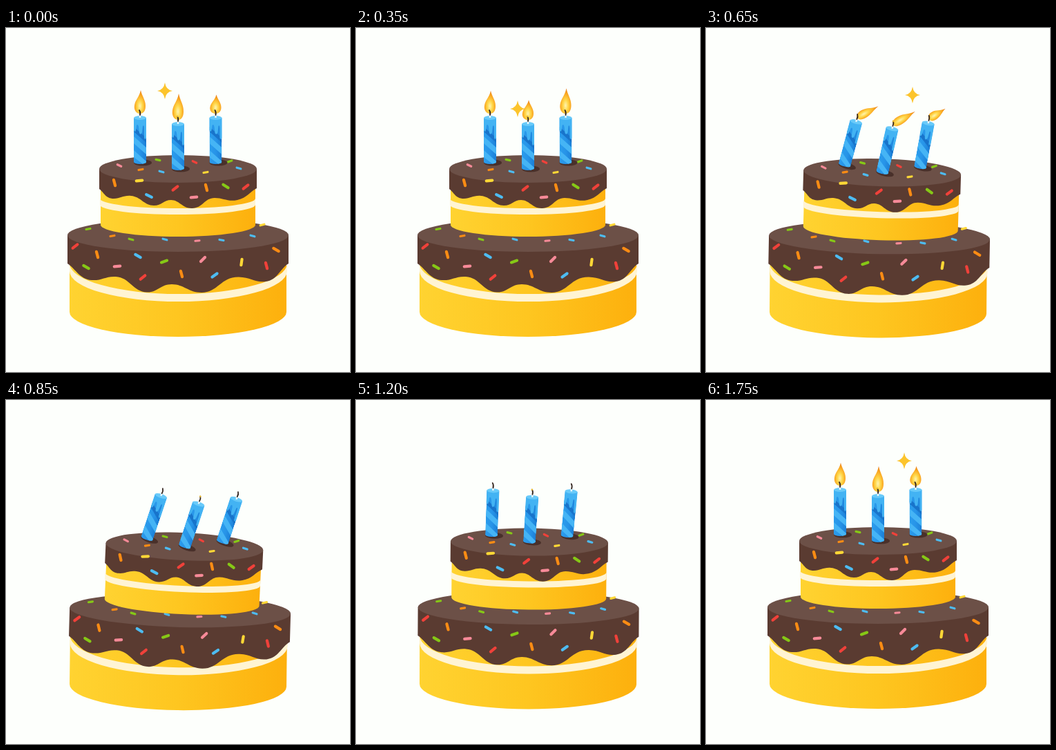
An HTML page that plays this animation: 498 px wide and 498 px high, repeating every 1.8 s.

```html
<!DOCTYPE html>
<html lang="en">
<head>
<meta charset="utf-8">
<title>Birthday cake</title>
<style>
html, body { margin: 0; width: 100%; height: 100%; overflow: hidden; background: #fdfffc; }
svg { display: block; width: 100vw; height: 100vh; }
</style>
</head>
<body>
<svg viewBox="0 0 498 498">
  <defs>
    <linearGradient id="sponge">
      <stop offset="0" stop-color="#ffd331"/>
      <stop offset=".5" stop-color="#fec620"/>
      <stop offset="1" stop-color="#fdb00d"/>
    </linearGradient>
    <linearGradient id="wax">
      <stop offset="0" stop-color="#2b9cec"/>
      <stop offset=".5" stop-color="#2794e8"/>
      <stop offset="1" stop-color="#1b7fd6"/>
    </linearGradient>
    <radialGradient id="fire" cx=".5" cy=".68" r=".65">
      <stop offset="0" stop-color="#fff3b0"/>
      <stop offset=".35" stop-color="#ffd84a"/>
      <stop offset=".75" stop-color="#f9a41f"/>
      <stop offset="1" stop-color="#e9811f"/>
    </radialGradient>
    <clipPath id="stick"><path d="M-9-65V-1A9 3 0 0 0 9-1V-65Z"/></clipPath>
    <g id="candle">
      <ellipse cx="4" cy="0" rx="13" ry="4.5" fill="#49302a"/>
      <g clip-path="url(#stick)">
        <path d="M-9-70H9V4H-9Z" fill="url(#wax)"/>
        <path d="M-9-38L9-22V-12L-9-28ZM-9-18L9-2V6L-9-8Z" fill="#45b4f5"/>
        <path d="M-9-52L9-36V-29L-9-45Z" fill="#1874cb"/>
      </g>
      <path d="M-9-65V-47Q-7.500-43-6-47L-5-54Q-3-57-2-52L-1-43Q1-39 3-44L4-53Q6-56 6-48V-36Q7.500-32 9-36V-65Z" fill="#43b3f3"/>
      <ellipse cy="-65" rx="9" ry="3" fill="#69caf9"/>
      <path d="M0-65V-70" stroke="#e9f6fb" stroke-width="2.500"/>
    </g>
  </defs>

  <g id="base">
    <path d="M92 325V411A157 36 0 0 0 406 411V325Z" fill="url(#sponge)"/>
    <path d="M92 341A157.500 44 0 0 0 407 341V352A157.500 44 0 0 1 92 352Z" fill="#fff4d3"/>
  </g>
  <g id="icing">
    <path d="M89 300V341C101 349 107 364 124 365C139 366 144 359 159 360C179 361 184 382 204 382.500C220 383 223 371 240 371C258 371 264 383 283 383C307 383 311 360 337 360.500C355 361 360 369 376 367C393 365 396 349 409 341V300Z" fill="#5a3b31"/>
    <ellipse cx="249" cy="300" rx="160" ry="24" fill="#6c5047"/>
  </g>
  <g id="upper">
    <path d="M137 225V285A112 17 0 0 0 361 285V225Z" fill="url(#sponge)"/>
    <path d="M136 247A112.500 14 0 0 0 361 247V256A112.500 14 0 0 1 136 256Z" fill="#fff4d3"/>
    <path d="M135 204V233C142 238 144 247 156 247C166 247 170 242 181 243C195 244 200 257 214 257C226 257 228 249 239 249C251 249 255 261 269 261C285 261 287 246 302 246C315 246 321 252 335 249C349 246 353 237 363 232V204Z" fill="#5a3b31"/>
    <ellipse cx="249" cy="204" rx="114" ry="20" fill="#6c5047"/>
  </g>
  <path id="spark" d="M0-12Q1.500-1.500 11 0Q1.500 1.500 0 12Q-1.500 1.500-11 0Q-1.500-1.500 0-12Z" fill="#fcc42c"/>
  <g id="candles"></g>
</svg>
<script>
const LOOP = 1800, STEP = 50;
const $ = id => document.getElementById(id);
const colors = { r: '#f0413a', o: '#fb8c14', y: '#ffd836', g: '#86c816', b: '#4dbcf2', p: '#f78a98' };

// Each sprinkle: color, x, y, angle
function sprinkle(id, length, width, items) {
  $(id).insertAdjacentHTML('beforeend', items.split(',').map(item => {
    const [c, x, y, angle] = item.split(' ');
    return `<path d="M${-length / 2} 0H${length / 2}" stroke="${colors[c]}" stroke-width="${width}"
      stroke-linecap="round" transform="translate(${x} ${y}) rotate(${angle})"/>`;
  }).join(''));
}
sprinkle('icing', 6, 3.2, 'g 119 291 -10,o 154 301 -10,g 181 306 15,b 230 306 15,p 277 308 -5,b 312 307 10,b 357 301 15,y 371 285 -15');
sprinkle('icing', 8.5, 4.2, 'r 100 316 -38,o 132 328 75,b 191 330 30,o 391 321 30,p 285 335 -45,g 229 338 -20,y 341 339 -82,g 116 346 30,p 161 345 -5,o 254 356 75,r 198 361 -40,b 302 358 -35,r 377 344 75');
sprinkle('upper', 6, 3.2, 'p 164 199 25,o 195 205 -10,g 220 191 12,b 225 208 15,r 273 194 25,y 289 209 -10,g 324 193 -20,b 337 203 15');
sprinkle('upper', 8.5, 4.2, 'o 157 224 75,y 193 221 -5,b 207 243 25,r 245 232 -38,p 272 245 -5,o 290 231 75,g 318 229 33,r 347 230 -38');

const candles = [
  { x: 194, y: 195, on: 1380, height: p => 34 + 1.5 * Math.sin(p) },
  { x: 303.5, y: 195, on: 1630, height: p => 32.5 - 5 * Math.cos(p), late: 50 },
  { x: 249, y: 204, on: 1540, height: p => 33 + 5 * Math.cos(p), late: 25, ember: true }
];
for (const c of candles) {
  $('candles').insertAdjacentHTML('beforeend', `<g><use href="#candle"/>
    <path d="M0 0C-6 0-9-6-8-12C-7-20-1-24 1-34C3-25 8-20 8-11C8-4 5 0 0 0Z" fill="url(#fire)"/>
    <path d="M0-69Q1-73-1-76" fill="none" stroke="#33251f" stroke-width="1.800" stroke-linecap="round"/>
    ${c.ember ? '<circle cx="-1" cy="-76" r="1.300" fill="#e8b82c"/>' : ''}</g>`);
  c.node = $('candles').lastElementChild;
  c.flame = c.node.children[1];
}

// Linear interpolation through rows of [time, ...values]
function at(t, keys) {
  const i = keys.findIndex(k => k[0] > t);
  if (i === 0) return keys[0].slice(1);
  if (i < 0) return keys[keys.length - 1].slice(1);
  const a = keys[i - 1], b = keys[i], f = (t - a[0]) / (b[0] - a[0]);
  return a.slice(1).map((v, j) => v + (b[j + 1] - v) * f);
}

const lean = [[500, 0], [550, .2], [650, .65], [750, .88], [850, 1], [950, 1.05], [1050, .8], [1100, .6], [1200, .2], [1300, 0]];
const tilt = [[500, 0], [600, .57], [650, .86], [700, .97], [850, 1.02], [950, 1.02], [1050, .8], [1100, .57], [1150, .32], [1200, .1], [1250, 0]];
const bend = [[500, 0], [600, 28], [650, 45], [750, 58]];
// Times run past the loop end; the spark flies on into the next round
const flight = [
  [1300, 148, 112, 0], [1400, 194, 92, 1], [1500, 254, 88, 1], [1600, 306, 90, 1], [1700, 318, 92, 1],
  [1750, 287, 88, 1], [1800, 230, 91, 1], [1900, 185, 98, 1], [2000, 178, 115, 1], [2150, 234, 117, 1],
  [2250, 290, 95, 1], [2350, 308, 60, 1], [2400, 305, 78, 1], [2450, 299, 97, 1],
  [2500, 335, 112, 1], [2550, 380, 100, .9], [2600, 406, 88, 0]
];

function draw(t) {
  const [push] = at(t, lean);
  const turn = deg => `rotate(${deg * push} 75 415)`;
  $('base').setAttribute('transform', turn(.7));
  $('icing').setAttribute('transform', turn(1.6));
  $('upper').setAttribute('transform', turn(2.6));
  $('candles').setAttribute('transform', turn(2.6));

  for (const c of candles) {
    const [lit] = t < 1000 ? at(t, [[700, 1], [800, 0]]) : at(t, [[c.on, 0], [c.on + 100, 1]]);
    const angle = 15.5 * at(t - (c.late || 0), tilt)[0];
    const blown = t < 1000 ? at(t, bend)[0] : 0;
    const tall = c.height(t / 600 * 2 * Math.PI) / 34;
    c.node.setAttribute('transform', `translate(${c.x} ${c.y}) rotate(${angle})`);
    c.flame.setAttribute('transform',
      `translate(0 -71) rotate(${blown}) scale(${lit * (1 - blown / 200)} ${lit * tall})`);
  }

  const [x, y, size] = at(t < 1000 ? t + LOOP : t, flight);
  $('spark').setAttribute('transform', `translate(${x} ${y}) scale(${size})`);
}

const start = performance.now();
function tick() {
  const t = (performance.now() - start) % LOOP;
  draw(Math.floor(t / STEP) * STEP);
  requestAnimationFrame(tick);
}
tick();
</script>
</body>
</html>
```
